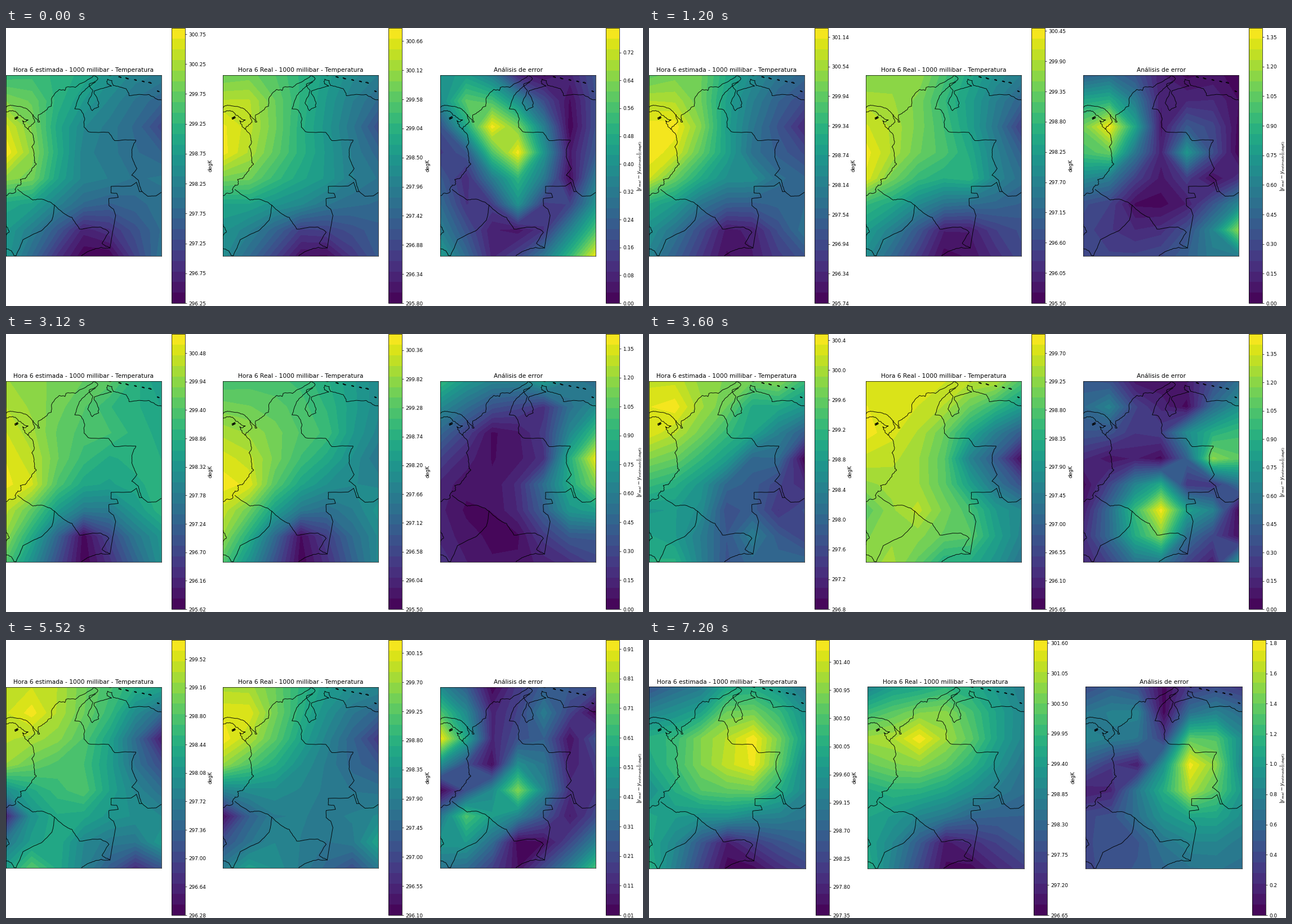
Recreate the animation shown at these times as a matplotlib script. Size 1131 px wide and 495 px high, loop 8 s.

```python
import numpy as np
import matplotlib.pyplot as plt
from matplotlib.animation import FuncAnimation

W, H, DPI = 1131, 495, 64
STEP_MS, FRAMES = 400, 20
BANDS = 26

plt.rcParams["font.family"] = "DejaVu Sans"
fig = plt.figure(figsize=(W / DPI, H / DPI), dpi=DPI, facecolor="white")

LON = np.linspace(-80, -65, 7)
LAT = np.linspace(12.5, -5, 8)
COL, ROW = np.meshgrid(np.arange(7), np.arange(8))
TITLES = ("Hora 6 estimada - 1000 millibar - Temperatura",
          "Hora 6 Real - 1000 millibar - Temperatura",
          "Análisis de error")
LABELS = ("degK", "degK", r"$|y_{real} - y_{estimado}|_{(degK)}$")

rng = np.random.default_rng(4)
lines = []
scenes = []


def line(*points, rough=0.08):
    """Polyline through lon, lat points, roughened by midpoint displacement."""
    p = np.array(points, float)
    for _ in range(3):
        seg = np.diff(p, axis=0)
        mid = p[:-1] + seg / 2
        size = np.hypot(*seg.T)[:, None] + 1e-9
        push = rng.uniform(-1, 1, size.shape) * np.minimum(rough / size, 0.25)
        mid += push * np.column_stack([-seg[:, 1], seg[:, 0]])
        q = np.empty((len(p) + len(mid), 2))
        q[::2], q[1::2] = p, mid
        p, rough = q, rough * 0.6
    lines.append(p)


def island(lon, lat, w, h):
    a = np.linspace(0, 2 * np.pi, 7)
    line(*zip(lon + w * np.cos(a), lat + h * np.sin(a) - w * np.cos(a) / 3), rough=0.03)


def spread(points):
    """Fill the weather grid from a few (column, row, value) points."""
    c, r, v = np.array(points, float).T
    n = len(v)
    a = np.ones((n + 1, n + 1))
    a[:n, :n] = np.hypot(c[:, None] - c, r[:, None] - r)
    a[n, n] = 0
    weight = np.linalg.solve(a, np.append(v, 0))
    dist = np.hypot(COL[..., None] - c, ROW[..., None] - r)
    return dist @ weight[:n] + weight[n]


def inside(grid, scale):
    lo, span, _ = scale
    return np.clip(grid, lo + 0.005 * span, lo + 0.995 * span)


def scene(est, real, err, warmth, offset):
    """Scales are (low, span, tick); key values are percent of a scale's span."""
    truth = inside(real[0] + real[1] * spread(warmth) / 100, real)
    miss = err[1] * spread(offset) / 100
    scenes.append(((est, inside(truth + miss, est)), (real, truth),
                   (err, inside(abs(miss), err))))


# northern coast with the lake
line((-80, 9.3), (-79.6, 9.58), (-78.5, 9.42), (-77.7, 9), (-76.95, 8.2), (-76.9, 7.95),
     (-76.74, 7.95), (-76.85, 8.65), (-76.25, 9), (-75.6, 9.5), (-75.55, 10.3),
     (-74.85, 11.1), (-74.3, 11), (-74.2, 11.3), (-73.3, 11.3), (-72.3, 11.9),
     (-71.5, 12.46), (-71.13, 12.1), (-71.97, 11.6), (-71.6, 10.95), (-72.1, 9.8),
     (-71.65, 9.05), (-71.05, 9.4), (-71.05, 9.9), (-71.5, 10.75), (-71.45, 10.97),
     (-69.8, 11.45), (-70.2, 11.63), (-70.2, 12.1), (-69.75, 11.95), (-69.65, 11.5),
     (-68.4, 11.18), (-68.1, 10.5), (-66.2, 10.62), (-65.5, 10.2), (-65, 10.1))
# Pacific coast
line((-80, 8.9), (-79.1, 9), (-78.4, 8.4), (-77.85, 8.15), (-78.4, 8.08), (-78.15, 7.5),
     (-77.35, 6.6), (-77.3, 5.8), (-77.5, 5.55), (-77.25, 4.2), (-77.05, 3.9),
     (-77.5, 3.25), (-78, 2.6), (-78.6, 2.4), (-78.6, 1.85), (-79, 1.65), (-79.05, 1.18),
     (-80, 0.82), rough=0.14)
line((-80, -1.95), (-79.75, -2.5), (-79.72, -2.75), (-80, -3.35), rough=0.14)
# land borders
line((-77.36, 8.67), (-77.2, 7.95), (-77.6, 7.55), (-77.9, 7.25))
line((-71.35, 11.82), (-72.3, 11.15), (-72.9, 10.5), (-73.35, 9.22), (-72.75, 9.1),
     (-72.4, 8.35), (-72.45, 7.45), (-72, 7), (-70.1, 6.95), (-69.5, 6.15), (-67.45, 6.2),
     (-67.8, 5.4), (-67.85, 4.6), (-67.35, 3.45), (-67.85, 2.8), (-67.2, 2.3),
     (-66.87, 1.23), rough=0.06)
line((-65, 1.13), (-65.5, 0.8), (-66.3, 0.76), (-66.87, 1.23), (-67.1, 1.2), (-67.4, 2.12),
     (-67.9, 1.76), (-69.85, 1.72), (-69.85, 1.08), (-69.3, 1.05), (-69.15, 0.65),
     (-70.05, 0.55), (-70.05, -0.15), (-69.6, -0.5), (-69.4, -1.1), (-69.95, -4.25),
     rough=0.02)
line((-69.95, -4.25), (-70.72, -3.8), (-70.05, -2.73), (-70.9, -2.22), (-72.9, -2.42),
     (-73.6, -1.3), (-74.2, -1.02), (-75.3, -0.1), (-76.3, 0.42), (-77.4, 0.4),
     (-78.85, 1.42))
line((-75.3, -0.1), (-75.55, -1.55), (-76.6, -2.6), (-78.35, -3.45), (-79, -4.98),
     (-79.25, -4.95), (-79.5, -4.5), (-80, -4.3), rough=0.05)
line((-69.95, -4.25), (-70.8, -4.18), (-71.9, -4.52), (-72.75, -5.1))
for lon in (-70, -69, -68.3, -67.5, -66.75, -66.1):
    island(lon, 12.5 - 0.19 * (lon + 70), rng.uniform(0.06, 0.15), 0.04)
island(-65.3, 10.93, 0.1, 0.03)
for k in range(3):
    island(-79.08 + 0.1 * k, 8.3 + 0.05 * k, 0.05, 0.1)

scene((296.25, 4.6, 0.5), (295.8, 5.1, 0.54), (0, 0.79, 0.08),
      [(0, 0, 77), (6, 0, 42), (1, 1, 89), (0, 2, 97), (3, 2, 63), (6, 2, 24), (0, 3, 98),
       (1, 4, 78), (4, 4, 53), (6, 4, 38), (0, 5, 57), (3, 5, 47), (3, 6, 18), (0, 7, 48),
       (3, 7, 4), (4, 7, 3), (6, 7, 28)],
      [(0, 0, -52), (3, 0, -10), (6, 0, 25), (1, 1, -74), (2, 2, -98), (5, 2, 0),
       (0, 3, 18), (3, 3, -98), (1, 4, 12), (5, 4, 2), (6, 4, 40), (3, 5, -50),
       (2, 6, 8), (4, 6, 15), (0, 7, 55), (2, 7, 10), (6, 7, 96)])

scene((295.74, 5.58, 0.6), (295.5, 5, 0.55), (0, 1.395, 0.15),
      [(0, 0, 80), (2, 0, 84), (6, 0, 42), (3, 1, 66), (6, 2, 18), (0, 3, 98), (3, 3, 71),
       (0, 4, 95), (4, 4, 64), (6, 4, 36), (0, 5, 66), (3, 6, 8), (4, 6, 8), (0, 7, 48),
       (3, 7, 2), (6, 7, 22)],
      [(0, 0, 30), (3, 0, 8), (6, 0, -2), (0, 2, 78), (1, 2, 98), (2, 2, 58), (3, 2, -6),
       (6, 2, -2), (1, 3, 76), (4, 3, -52), (5, 4, -3), (0, 5, 24), (2, 5, 3), (3, 5, 2),
       (6, 4, 14), (6, 6, 82), (2, 7, 20), (6, 7, 42)])

scene((295.62, 5.22, 0.54), (295.5, 5.16, 0.54), (0, 1.425, 0.15),
      [(0, 0, 70), (3, 0, 68), (6, 0, 47), (0, 2, 87), (4, 2, 68), (6, 3, 38), (0, 4, 98),
       (1, 4, 95), (2, 5, 56), (3, 5, 40), (6, 5, 52), (0, 6, 84), (3, 6, 3), (0, 7, 72),
       (3, 7, 1), (6, 7, 47)],
      [(0, 0, 66), (4, 0, 56), (6, 0, 34), (4, 1, 14), (0, 2, 32), (2, 2, 3), (3, 3, 6),
       (4, 3, 14), (5, 3, 62), (6, 3, 96), (0, 4, 10), (4, 4, 36), (6, 4, 80), (1, 5, 3),
       (5, 5, 52), (3, 6, 3), (6, 6, 28), (0, 7, 14), (5, 7, 14)])

scene((296.8, 3.68, 0.4), (295.65, 4.35, 0.45), (0, 1.455, 0.15),
      [(0, 0, 94), (5, 0, 88), (3, 1, 88), (6, 1, 54), (0, 2, 98), (3, 3, 74), (4, 3, 44),
       (6, 3, 2), (0, 5, 74), (2, 5, 90), (4, 5, 70), (6, 5, 46), (4, 6, 74), (1, 7, 86),
       (3, 7, 62), (6, 7, 38)],
      [(0, 0, 28), (2, 0, 6), (6, 0, 36), (1, 1, 44), (4, 1, 2), (4, 2, 48), (1, 3, 5),
       (3, 3, -2), (5, 3, 82), (6, 3, 74), (3, 4, -60), (4, 4, -16), (0, 5, -8),
       (3, 5, -98), (5, 5, -44), (3, 6, -80), (4, 6, -36), (6, 6, -4), (1, 7, -20),
       (6, 7, 50)])

scene((296.28, 3.48, 0.36), (296.1, 4.25, 0.45), (0.01, 0.93, 0.1),
      [(0, 0, 87), (3, 0, 64), (6, 0, 46), (1, 1, 95), (0, 2, 99), (2, 2, 74), (6, 2, 16),
       (0, 3, 84), (3, 3, 50), (1, 4, 48), (0, 5, 3), (4, 5, 41), (2, 6, 46), (6, 6, 58),
       (1, 7, 56), (5, 7, 24)],
      [(0, 0, -48), (2, 0, -2), (6, 0, 24), (4, 1, 42), (0, 2, -99), (1, 2, -60),
       (5, 2, 5), (6, 2, -26), (2, 3, 4), (3, 3, 50), (0, 4, 0), (3, 4, 82), (6, 4, -16),
       (1, 5, 72), (5, 5, 8), (0, 6, 54), (3, 6, 0), (2, 7, 20), (6, 7, -70)])

scene((296.12, 3.64, 0.4), (296.68, 3.64, 0.4), (0, 1.455, 0.15),
      [(0, 0, 86), (3, 0, 56), (6, 0, 30), (1, 1, 99), (5, 1, 8), (0, 2, 94), (3, 2, 58),
       (6, 2, 18), (3, 3, 54), (0, 4, 52), (6, 4, 26), (1, 5, 56), (4, 5, 2), (3, 6, 8),
       (0, 7, 42), (4, 7, 8), (6, 7, 44)],
      [(0, 0, -46), (5, 0, -16), (5, 1, -32), (2, 2, -66), (3, 2, -84), (6, 2, -72),
       (0, 3, -18), (3, 3, -98), (5, 3, -74), (2, 4, -68), (5, 4, -8), (0, 5, -78),
       (3, 5, -28), (5, 5, 40), (0, 6, -92), (1, 6, -90), (3, 6, -14), (5, 6, 2),
       (3, 7, -12), (6, 7, -50)])

scene((297.35, 4.4, 0.45), (296.65, 5, 0.55), (0, 1.82, 0.2),
      [(0, 0, 44), (2, 0, 58), (6, 0, 42), (3, 1, 82), (0, 2, 86), (2, 2, 99), (4, 2, 74),
       (1, 3, 80), (6, 3, 38), (0, 4, 60), (3, 4, 58), (3, 5, 40), (3, 6, 6), (6, 6, 27),
       (0, 7, 62), (3, 7, 3), (4, 7, 2)],
      [(0, 0, -22), (3, 0, 2), (6, 0, 16), (2, 1, -44), (0, 2, -46), (2, 2, -38),
       (3, 2, 18), (4, 2, 74), (5, 2, 72), (2, 3, 8), (4, 3, 98), (5, 3, 82), (6, 3, 44),
       (0, 4, -8), (2, 4, 40), (4, 4, 88), (0, 5, 22), (4, 5, 58), (2, 6, 26), (6, 6, 40),
       (0, 7, 22)])

# first map left, first bar left, spacing, map (width, top, height)
NARROW = -0.3, 293.5, 385.7, (276, 83.8, 321.7)
WIDE = -0.1, 295.6, 387.6, (278, 83.2, 323.8)


def axes(x, y, w, h):
    return fig.add_axes([x / W, 1 - (y + h) / H, w / W, h / H])


def draw(n):
    k = min(n // 3, len(scenes) - 1)
    fig.clear()
    map_x, bar_x, gap, (w, top, h) = WIDE if k == len(scenes) - 1 else NARROW
    for i, ((lo, span, tick), grid) in enumerate(scenes[k]):
        ax = axes(map_x + gap * i, top, w, h)
        levels = lo + span * np.linspace(0, 1, BANDS + 1)
        fill = ax.contourf(LON, LAT, grid, levels=levels, cmap="viridis")
        for p in lines:
            ax.plot(*p.T, color="black", lw=1)
        ax.set(xlim=(-80, -65), ylim=(-5, 12.5), xticks=[], yticks=[], title=TITLES[i])
        ticks = np.arange(lo, lo + span + 1e-6, tick)
        bar = fig.colorbar(fill, cax=axes(bar_x + gap * i, 0.4, 24.2, 489.6), ticks=ticks)
        bar.set_label(LABELS[i])
    return []


anim = FuncAnimation(fig, draw, frames=FRAMES, interval=STEP_MS, init_func=lambda: [],
                     repeat=True, repeat_delay=0, blit=False)
plt.show()
```
